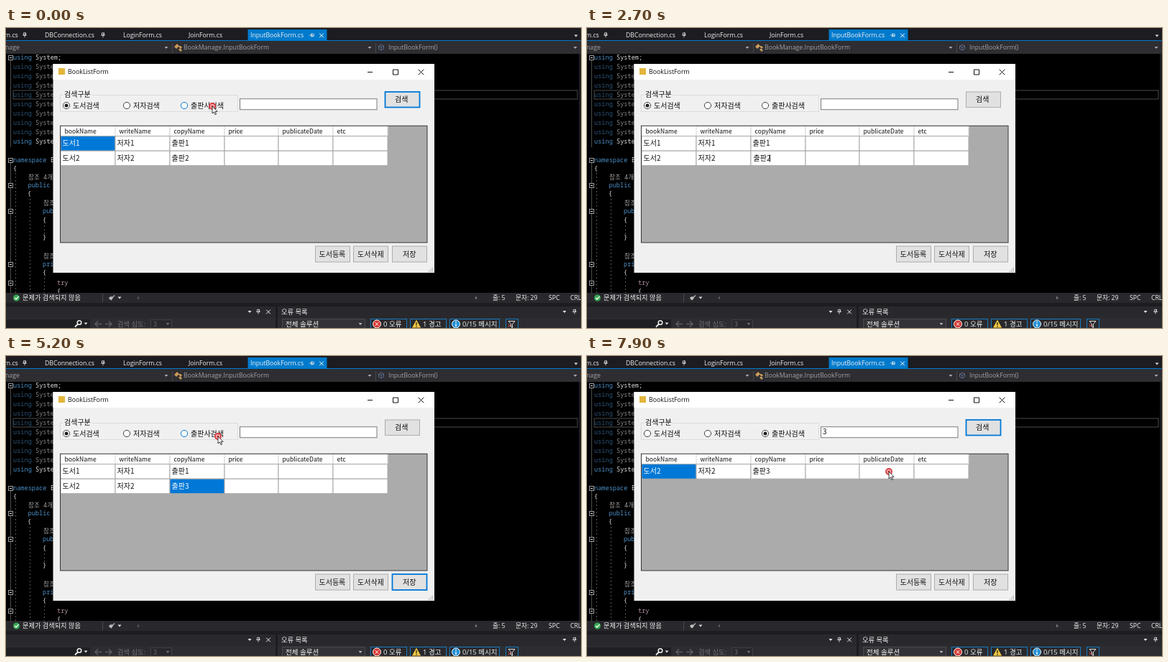
Recreate the animation shown at these times as an HTML page. Size 800 by 418 pixels, loop 8 s.

```html
<!DOCTYPE html>
<html lang="ko">
<head>
<meta charset="utf-8">
<title>BookListForm</title>
<style>
html, body { margin: 0; width: 100%; height: 100%; overflow: hidden; background: #000; }
svg { display: block; width: 800px; height: 418px; }
text { white-space: pre; }
.ui { font-family: "Open Sans", "Noto Sans CJK KR", "Noto Sans CJK", sans-serif; }
.form { font-family: "Noto Sans CJK KR", "Noto Sans CJK", sans-serif; }
.code { font-family: "Noto Sans Mono", "Noto Sans CJK KR", monospace; }
</style>
</head>
<body>
<svg id="stage" viewBox="0 0 800 418" width="800" height="418"></svg>
<script>
const stage = document.getElementById('stage');

function add(tag, attrs, parent = stage) {
  const el = document.createElementNS('http://www.w3.org/2000/svg', tag);
  for (const key in attrs) el.setAttribute(key, attrs[key]);
  return parent.appendChild(el);
}
const rect = (x, y, width, height, fill, more) => add('rect', { x, y, width, height, fill, ...more });
const box = (x, y, w, h, fill, stroke) => rect(x + .5, y + .5, w - 1, h - 1, fill, { stroke });
const line = (d, stroke, width = 1, more) =>
  add('path', { d, stroke, 'stroke-width': width, fill: 'none', ...more });
const shape = (d, fill) => add('path', { d, fill });
const disc = (cx, cy, r, fill, more) => add('circle', { cx, cy, r, fill, ...more });

// Text is placed by its left edge and its vertical middle.
function text(str, x, cy, fill, size, font) {
  const el = add('text', { x, y: cy + size * .36, fill, 'font-size': size, class: font });
  el.textContent = str;
  return el;
}
const ui = (str, x, cy, fill = '#f1f1f1', size = 8.7) => text(str, x, cy, fill, size, 'ui');
const form = (str, x, cy, size = 10, fill = '#111') => text(str, x, cy, fill, size, 'form');
const code = (str, x, cy, fill = '#dcdcdc') => text(str, x, cy, fill, 8.6, 'code');
const arrow = (x, y, fill = '#aaa') => shape(`M${x - 2.5} ${y - 1.5}h5l-2.5 3z`, fill);
const show = (el, on) => el.setAttribute('visibility', on ? 'visible' : 'hidden');

function pin(x, y, upright) {
  const g = line('M-2 -4h4v4h-4zM1 -4v4M-3.5 0h7M0 0v4', '#e6e6e6', 1);
  g.setAttribute('transform', `translate(${x} ${y}) scale(.8)${upright ? '' : ' rotate(90)'}`);
}
const cross = (x, y, r, color) =>
  line(`M${x - r} ${y - r}l${2 * r} ${2 * r}M${x + r} ${y - r}l${-2 * r} ${2 * r}`, color, 1);

function drawTabs() {
  rect(0, 0, 800, 18, '#1c1c21');
  rect(336.5, 2, 110, 16, '#007acc');
  rect(0, 17, 800, 1, '#007acc');
  [['m.cs', -2], ['DBConnection.cs', 54], ['LoginForm.cs', 163], ['JoinForm.cs', 254], ['InputBookForm.cs', 340]]
    .forEach(([name, x]) => ui(name, x, 10));
  [26, 135, 425].forEach(x => pin(x, 10, x < 400));
  cross(439, 10.5, 2.8, '#fff');
  arrow(793, 11, '#ddd');

  rect(0, 18, 800, 18, '#2d2d32');
  rect(231, 21, 1, 14, '#45454a');
  rect(514, 21, 1, 14, '#45454a');
  ui('nage', -1, 27, '#a5a5a5');
  ui('BookManage.InputBookForm', 247, 27, '#a5a5a5');
  ui('InputBookForm()', 532, 27, '#a5a5a5');
  [223, 506, 792].forEach(x => arrow(x, 27.5));
  shape('M234 26l4 -4 3 3 -4 4zM240 25h3l2 2 -2 2 -2 -2zM240 29h3l2 2 -2 2 -2 -2z', '#c99a58');
  line('M522 23l3.500 2v4l-3.500 2 -3.500 -2v-4zM518.500 25l3.500 2 3.500 -2M522 27v4', '#5f6c88');
}

function drawCode() {
  rect(0, 36, 800, 333, '#000');
  rect(10, 87, 785, 12, 'none', { stroke: '#4a4a4a' });
  line('M6.500 45V166M6.500 188V369', '#4c4c4c');
  line('M13.500 202V369M33.500 238V369M53.500 275V288M53.500 348V369', '#555', 1, { 'stroke-dasharray': '2 3' });
  for (let i = 0; i < 10; i++) {
    const y = 41 + 13 * i, live = i === 0 || i === 9;
    code('using', 10, y, live ? '#4c8fc7' : '#2b5478');
    code(i ? 'System.' : 'System;', 41, y, live ? '#dcdcdc' : '#858585');
  }
  [
    ['namespace', 10, 184, '#4c8fc7'], ['E', 62, 184],
    ['{', 10, 196], ['참조 4개', 31, 208, '#a0a0a0'],
    ['public', 30.5, 219, '#4c8fc7'], ['{', 30, 231],
    ['참조', 52, 244, '#a0a0a0'], ['public', 51, 255, '#4c8fc7'],
    ['{', 51, 268], ['}', 51, 292], ['참조', 52, 318, '#a0a0a0'],
    ['private', 51, 329, '#4c8fc7'], ['{', 51, 341],
    ['try', 71, 355, '#b794a8'], ['{', 71, 367]
  ].forEach(row => code(...row));
  [41, 184, 219, 255, 329, 355].forEach(y => {
    box(3, y - 3, 7, 7, '#000', '#999');
    line(`M5 ${y + .5}h3`, '#ddd');
  });
  rect(797, 36, 3, 333, '#1c1c20');
}

function drawPanels() {
  rect(0, 369, 800, 14, '#29292d');
  disc(14.5, 376, 4.5, '#35a852');
  line('M12 376l2 2 3.500 -4', '#fff', 1.2);
  ui('문제가 검색되지 않음', 23, 376, '#f1f1f1', 9.2);
  rect(134, 370, 1, 12, '#48484d');
  line('M151 372.500l-3 3', '#bbb', 1.2);
  shape('M143.500 375l3.500 -1 2 2 -2.500 3.500 -3 -2z', '#bbb');
  arrow(158, 376, '#ddd');
  shape('M185 373.500v5l-3 -2.500z', '#555');
  shape('M653 373.500v5l3 -2.500z', '#777');
  [['줄: 5', 677], ['문자: 29', 709], ['SPC', 755], ['CRLF', 785]].forEach(([s, x]) => ui(s, x, 376));

  rect(0, 383, 800, 35, '#1c1c21');
  rect(0, 388, 375, 30, '#29292d');
  rect(378, 388, 422, 30, '#29292d');
  arrow(339, 395.5, '#eee');
  pin(351, 395.5, true);
  cross(365, 395.5, 2.8, '#eee');
  ui('오류 목록', 383, 395.5, '#f1f1f1', 9.3);
  arrow(777, 395.5, '#eee');
  pin(791, 395.5, true);

  rect(0, 404, 375, 14, '#2d2d31');
  rect(0, 406, 117, 12, '#1f1f23');
  disc(102, 410.5, 2.8, 'none', { stroke: '#eee', 'stroke-width': 1.5 });
  line('M100 412.500l-4 4', '#eee', 1.8);
  arrow(111, 412, '#ddd');
  line('M133 412.500h-9m4 -4l-4 4 4 4M138 412.500h9m-4 -4l4 4 -4 4', '#5c5c61', 1.5);
  ui('검색 심도:', 155, 412.5, '#6f6f75', 9.3);
  box(201, 406, 30, 14, '#29292d', '#3f3f44');
  ui('3', 205, 412.5, '#6f6f75');
  arrow(225, 412.5, '#6f6f75');

  rect(378, 404, 422, 14, '#2d2d31');
  box(384, 405, 116, 16, '#333337', '#48484d');
  ui('전체 솔루션', 389, 412.5, '#f1f1f1', 9.5);
  arrow(493, 412.5, '#bbb');
  [[507, 51], [562, 51], [617, 70], [695, 18]].forEach(([x, w]) => box(x, 405, w, 16, '#29292d', '#177bc0'));
  disc(516, 412.5, 5.5, '#d43a36', { stroke: '#fff' });
  cross(516, 412.5, 2.2, '#fff');
  shape('M571 406.500l6 11h-12z', '#f2c83d');
  line('M571 410v4M571 415v1.500', '#222', 1.3);
  disc(626, 412.5, 5.5, '#248fd6', { stroke: '#fff' });
  line('M626 409v1.500M626 412v4', '#fff', 1.4);
  ui('0 오류', 525, 412.5, '#f1f1f1', 9.5);
  ui('1 경고', 580, 412.5, '#f1f1f1', 9.5);
  ui('0/15 메시지', 635, 412.5, '#f1f1f1', 9.5);
  line('M699 408.500h9l-3.500 4v5l-2 -1.500v-3.500z', '#ddd');
  cross(700.5, 414.5, 2, '#e0504a');
}

function button(x, y, h, label, tx) {
  const face = rect(x + .5, y, 48, h, '#e1e1e1', { stroke: '#adadad' });
  form(label, tx, y + h / 2);
  return (hover, focus) => {
    face.setAttribute('fill', hover ? '#e5f1fb' : '#e1e1e1');
    face.setAttribute('stroke', hover ? '#2f8fdd' : focus ? '#0078d7' : '#adadad');
    face.setAttribute('stroke-width', focus && !hover ? 1.8 : 1);
  };
}

function radio(x, label) {
  const ring = disc(x, 108, 4.6, '#fff', { stroke: '#444' });
  const dot = disc(x, 108, 2.5, '#222');
  form(label, x + 9, 108);
  return (checked, hover) => {
    show(dot, checked);
    ring.setAttribute('stroke', hover ? '#0078d7' : '#444');
  };
}

const edges = [76, 152, 228, 304, 379, 455, 531];

function gridRow(y, words) {
  const cells = [], labels = [], parts = [];
  for (let i = 0; i < 6; i++) {
    const cell = rect(edges[i], y, edges[i + 1] - edges[i], 20.5, '#fff', { stroke: '#a8a8a8' });
    cells.push(cell);
    parts.push(cell);
  }
  words.forEach((word, i) => labels.push(form(word, edges[i] + 2.5, y + 10)));
  parts.push(...labels);
  return {
    labels,
    show: on => parts.forEach(p => show(p, on)),
    select: col => cells.forEach((cell, i) => {
      cell.setAttribute('fill', i === col ? '#0078d7' : '#fff');
      if (labels[i]) labels[i].setAttribute('fill', i === col ? '#fff' : '#111');
    })
  };
}

drawTabs();
drawCode();
drawPanels();

rect(65.5, 50, 530.5, 291, '#f0f0f0');
rect(65.5, 50, 530.5, 22, '#fff');
rect(73, 56, 9, 9, '#e2b53c');
ui('BookListForm', 86, 61, '#111', 8.8);
line('M503 61.500h7M538.500 58h7v7h-7z', '#111');
cross(577.5, 61.5, 3.8, '#111');
line('M593 334v6M590.500 336.500v3.500M588 339v1', '#a5a5a5', 1.5, { 'stroke-dasharray': '1.5 1' });

rect(75.5, 93.5, 247, 23, 'none', { stroke: '#dcdcdc' });
rect(79, 88, 40, 10, '#f0f0f0');
form('검색구분', 81, 92.3);
const radios = [radio(84, '도서검색'), radio(168, '저자검색'), radio(248, '출판사검색')];
const field = rect(325.5, 98.7, 190.5, 15, '#fff', { stroke: '#7c7c7c' });
const query = form('3', 328, 105);
const queryCaret = line('M333.500 100v10', '#111');
const search = button(527, 89, 21.5, '검색', 541);
const enroll = button(430, 304, 22, '도서등록', 435.5);
const remove = button(483, 304, 22, '도서삭제', 489);
const save = button(537, 304, 22, '저장', 552);

rect(75.5, 136.3, 510.5, 162.7, '#ababab');
const heads = ['bookName', 'writeName', 'copyName', 'price', 'publicateDate', 'etc'];
heads.forEach((name, i) => {
  rect(edges[i], 136.5, edges[i + 1] - edges[i], 14, '#fff', { stroke: i ? '#d5d5d5' : '#fff' });
  form(name, edges[i] + 5.5, 143.5, 8.6);
});
const rows = [gridRow(150.7, ['도서1', '저자1', '출판1']), gridRow(171.2, ['도서2', '저자2', '출판2'])];
rect(75.5, 136.3, 510.5, 162.7, 'none', { stroke: '#383838' });
const cellCaret = line('M0 176.500v10', '#111');

const pointer = add('g', {});
const red = add('g', {}, pointer);
add('circle', { r: 4, fill: '#f3b4b4', stroke: '#da3f45', 'stroke-width': 1.9 }, red);
add('circle', { r: 1.6, fill: '#da3f45' }, red);
const blue = add('g', {}, pointer);
add('circle', { r: 7, fill: 'none', stroke: '#b5e1f6', 'stroke-width': 2, 'stroke-dasharray': '1.8 1.870' }, blue);
add('circle', { r: 4.8, fill: 'none', stroke: '#5cbce6', 'stroke-width': 2.4 }, blue);
const hand = add('path', {
  d: 'M0 0V10l2.300 -2.100 1.700 3.800 1.600 -.7 -1.700 -3.600h3.200z', fill: '#fff', stroke: '#111', 'stroke-width': .8
}, pointer);
const beam = add('path', { d: 'M-2 -4.500h4M0 -4.500v9M-2 4.500h4', fill: 'none', stroke: '#222' }, pointer);

// Pointer path: time, x, y
const path = [
  [0, 287, 109], [200, 290, 109], [500, 285, 111], [700, 285, 111], [1100, 271, 181], [1600, 271, 181],
  [1800, 267, 177], [3400, 267, 177], [3800, 548, 317], [4400, 548, 317], [5100, 295, 112], [5300, 295, 112],
  [5500, 350, 106], [5700, 350, 106], [6000, 531, 100], [6200, 550, 95], [7100, 550, 95], [7800, 420, 161], [8000, 420, 161]
];
const ease = p => p * p * (3 - 2 * p);

function place(t) {
  const i = path.findIndex(p => p[0] > t);
  const [t0, x0, y0] = path[i - 1], [t1, x1, y1] = path[i];
  const p = ease((t - t0) / (t1 - t0));
  return [x0 + (x1 - x0) * p, y0 + (y1 - y0) * p];
}

function draw(t) {
  const within = (a, b) => t >= a && t < b;
  const [x, y] = place(t);
  const over = (l, top, r, b) => x > l && x < r && y > top && y < b;

  const third = t >= 5400;
  radios[0](!third, false);
  radios[1](false, false);
  radios[2](third, over(243, 102, 303, 114));

  const fieldOn = within(5600, 7100);
  field.setAttribute('stroke', fieldOn || over(325, 98, 517, 114) ? '#3f95da' : '#7c7c7c');
  show(query, t >= 5800);
  show(queryCaret, within(5600, 6300));
  queryCaret.setAttribute('transform', `translate(${t < 5800 ? -5 : 0} 0)`);

  search(over(533, 88, 576, 111), t < 1100 || t >= 6300);
  enroll(false, false);
  remove(false, false);
  save(over(537, 303, 586, 327), within(4000, 5400));

  const found = t >= 6500, editing = within(1900, 4100);
  const words = found ? ['도서2', '저자2', '출판3'] : ['도서1', '저자1', '출판1'];
  rows[0].labels.forEach((el, i) => { el.textContent = words[i]; });
  rows[0].select(t < 1100 || found ? 0 : -1);
  rows[1].show(!found);
  rows[1].select(t >= 1100 && !editing ? 2 : -1);
  const entry = rows[1].labels[2];
  entry.textContent = '출판' + (t < 2900 ? '2' : t < 3200 ? '' : '3');
  entry.setAttribute('x', editing ? 231.5 : 230.5);
  show(cellCaret, editing);
  cellCaret.setAttribute('transform', `translate(${within(2900, 3200) ? 249.500 : 254.500} 0)`);

  const clicked = within(1100, 2500) || within(3200, 3500) || within(4100, 4500) || within(5300, 7200);
  const typing = within(2500, 3200), ibeam = within(1900, 3500) || within(5500, 5800);
  show(blue, clicked);
  show(red, !clicked && !typing);
  show(hand, !ibeam);
  show(beam, ibeam && !typing);
  pointer.setAttribute('transform', `translate(${x.toFixed(1)} ${y.toFixed(1)})`);
}

const start = performance.now();
function tick() {
  const t = Math.max(0, performance.now() - start) % 8000;
  draw(Math.floor(t / 100) * 100);
  requestAnimationFrame(tick);
}
tick();
</script>
</body>
</html>
```
